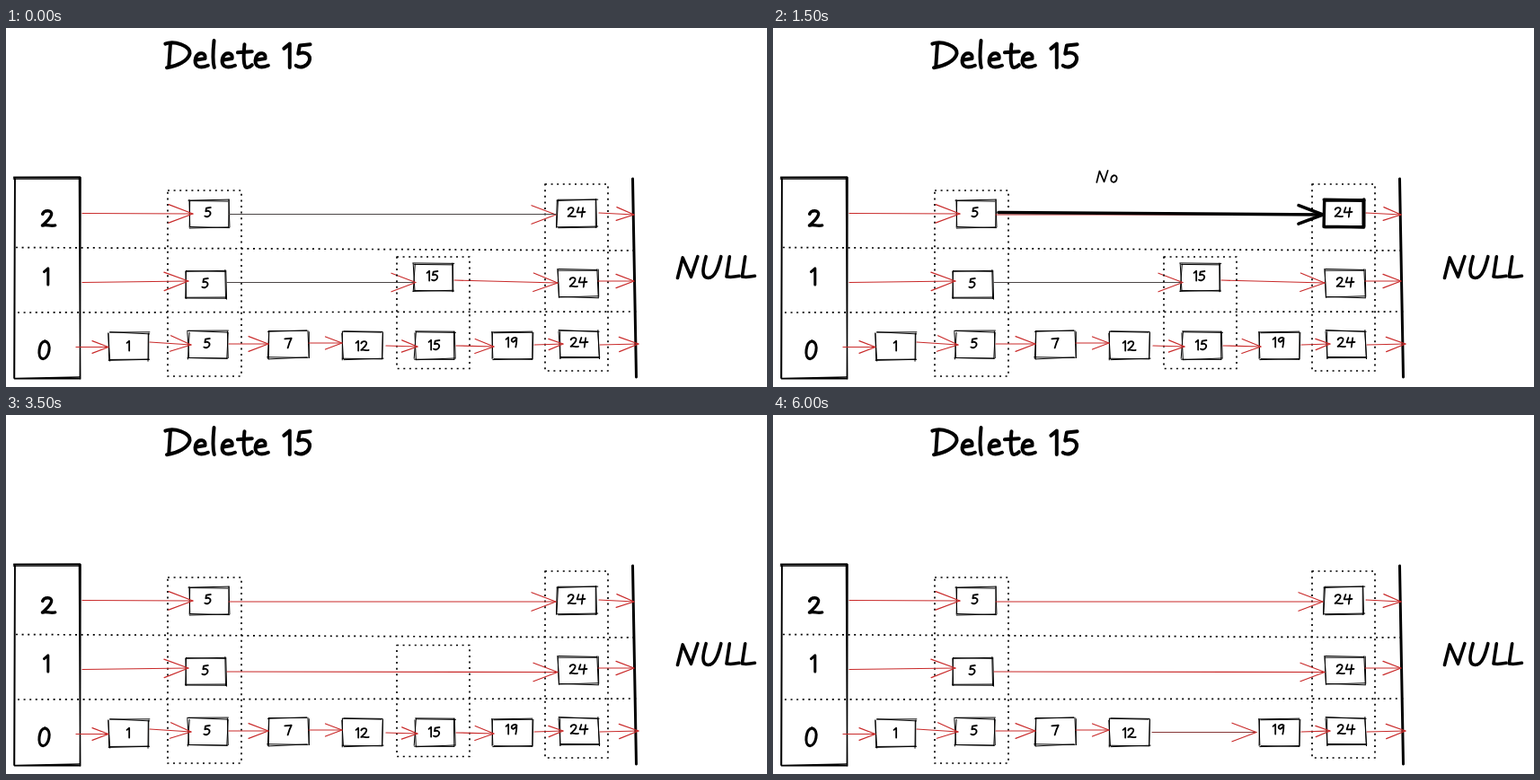
These frames come from a looping animation (847 by 400 pixels, 8 s). An HTML page:

```html
<!DOCTYPE html>
<html lang="en">
<head>
<meta charset="utf-8">
<title>Skip list: delete 15</title>
<style>
  html, body { margin: 0; width: 100%; height: 100%; overflow: hidden; background: #fff; }
  svg { display: block; width: 847px; height: 400px; }
  path { fill: none; stroke-linecap: round; stroke-linejoin: round; }
  text { font-family: "Open Sans", sans-serif; fill: transparent; }
</style>
</head>
<body>
<svg id="stage" viewBox="0 0 847 400"></svg>
<script>
const NS = 'http://www.w3.org/2000/svg';
const RED = '#c92a2a', INK = '#000', DIM = '#4c4646';
const SLOTS = 16; // 500 ms each, 8 s in all
const stage = document.getElementById('stage');
const sheet = document.head.appendChild(document.createElement('style'));
let layer = stage;

// Handwritten letters: advance and strokes, baseline at 0, capitals 10 high
const GLYPHS = {
  ' ': [5, ''],
  D: [11.4, 'M2.3-9.2L1.7-.1M.3-9.5C4-11 10.4-8.6 10.1-5.6C9.5-2.6 5-.6 .9 .1'],
  E: [7.5, 'M6-9.5L1.4-9L.8-.3L6-.6M1.2-5L5-5.3'],
  L: [7.3, 'M2-10L.6-.6C2.5-.2 4.5-.5 6.5-.9'],
  N: [11.5, 'M.2 0L2.6-9.5L6.5-.5L9.6-10'],
  U: [11, 'M2-10C.6-5-.5-.3 3 0C6.5 0 8-6 9-10'],
  a: [8, 'M5-5.5C2-7 0-2.5 1.2-.6C3 .5 4.8-3 5.2-5.4C4.8-2.5 5-.5 6.8 0'],
  e: [6.8, 'M.9-3L4.8-3.6C5.3-6 2.2-6.6 1.1-4C.2-1 2 .9 6-.8'],
  h: [7.5, 'M1.2-10L.8 0C1.5-3.5 3-5.8 4.6-5C5.6-4 4.8-1 5.8 0'],
  l: [4, 'M1.6-10.8C1.1-6 1.1-2 1.7 0'],
  n: [7.5, 'M.8-5.8L.9 0C1.5-4 3-6 4.6-5.2C5.8-4 5-1 6 0'],
  o: [7.5, 'M3.5-6C.5-5.5-.2-1 2.5-.2C6 .2 7-5.8 3.5-6'],
  q: [7.5, 'M5-5.5C2-7 0-3 1.2-1C3 0 4.8-3 5.2-5.5L4.6 3.5L6 2.5'],
  s: [6, 'M4.5-6C2-7 .5-4.8 2.5-3.8C5.5-2.5 4 .3 .3-.3'],
  t: [6.5, 'M3-9.3C2.6-5 2.4 0 4 0C5 0 5.5-.5 6-1M.3-6L6-6.4'],
  u: [7, 'M.8-5.8C.3-2 .8 0 2.2 0C4-.2 5-3 5.2-5.8C5-2.5 5-.5 6.2 0'],
  0: [8, 'M3.8-9.8C.5-9.3-.5-1 2.5-.2C6 .3 8-9 3.8-9.8'],
  1: [5, 'M.5-7.6L2.8-9.5L2.8 0'],
  2: [8.8, 'M.6-7.2C1.5-9.8 6.5-9.8 5.8-6.8C5-4 2-2 .5-.5C3-1.5 5 .2 8-.6'],
  4: [9.4, 'M2.2-9.3L.6-4.6C3-4.2 5.4-4.6 8.5-5M6.4-9L5.2 0'],
  5: [6.6, 'M6-9.3L1.8-8.8L1.2-5.5C4-6.8 6.5-5 5.6-2.5C4.8-.3 2 .4 .3-.8'],
  7: [7.5, 'M.3-9L6.8-9.5C5-6 4-3 3.2 0'],
  9: [7.5, 'M6-8.5C4-10.8 0-8 1.2-5.8C2.5-4 5.5-6.5 6-8.8C6-5 5.5-2 5 0'],
  '?': [6, 'M.6-8C1.5-11 6-10 5.2-7.5C4.5-5.5 2.8-5.5 2.6-3M2.5-.6L2.6 0']
};

let seed = 15;
const jitter = amp => {
  seed = (seed * 16807) % 2147483647;
  return (seed / 2147483647 - 0.5) * 2 * amp;
};

function add(tag, attrs, parent = layer) {
  const el = document.createElementNS(NS, tag);
  for (const key in attrs) el.setAttribute(key, attrs[key]);
  return parent.appendChild(el);
}

const stroke = (d, color, width, extra) =>
  add('path', { d, stroke: color, 'stroke-width': width, ...extra });

function write(str, x, y, scale, width) {
  add('text', { x, y, 'font-size': scale * 12 }).textContent = str;
  for (const ch of str) {
    const [advance, d] = GLYPHS[ch];
    if (d) stroke(d, INK, width / scale, { transform: `translate(${x} ${y}) scale(${scale})` });
    x += advance * scale;
  }
}

// Two loose passes around a rectangle
function box(x, y, w, h, width = 1, amp = 1.3) {
  const corners = [[x, y], [x + w, y], [x + w, y + h], [x, y + h]];
  let d = '';
  for (let pass = 0; pass < 2; pass++) {
    corners.forEach((p, i) => {
      const q = corners[(i + 1) % 4];
      d += `M${p[0] + jitter(amp)} ${p[1] + jitter(amp)}L${q[0] + jitter(amp)} ${q[1] + jitter(amp)}`;
    });
  }
  stroke(d, INK, width);
}

const heavyBox = (x, y) => box(x, y, 44, 30, 3.4, 0.7);

function node(label, x, y, tx, ty) {
  box(x, y, 44, 30);
  write(label, tx, ty - 0.5, 1.13, 1.8);
}

function tip(x1, y1, x2, y2, color, width) {
  const len = Math.hypot(x2 - x1, y2 - y1);
  const back = Math.min(27, len / 2), side = back * 0.38;
  const ux = (x2 - x1) / len, uy = (y2 - y1) / len;
  const bx = x2 - ux * back, by = y2 - uy * back;
  stroke(`M${bx - uy * side} ${by + ux * side}L${x2} ${y2}L${bx + uy * side} ${by - ux * side}`, color, width);
}

const line = (x1, y1, x2, y2, color = RED, width = 1.2) =>
  stroke(`M${x1} ${y1}L${x2} ${y2}`, color, width);

function arrow(x1, y1, x2, y2, color = RED, width = 1.2, shaft = color) {
  line(x1, y1, x2, y2, shaft, width);
  tip(x1, y1, x2, y2, color, width);
}

const heavyArrow = (...ends) => arrow(...ends, INK, 3.6);

const dotted = d => stroke(d, INK, 1.7, { 'stroke-dasharray': '2 4.6', style: 'stroke-linecap:butt' });
const dottedBox = (l, t, r, b) => dotted(`M${l} ${t}H${r}V${b}H${l}Z`);

// Draws a group that is visible from slot a up to slot b
let count = 0;
function during(a, b, draw) {
  const name = 'show' + count++;
  const pct = slot => slot / SLOTS * 100 + '%';
  let rules = `0%{visibility:${a ? 'hidden' : 'visible'}}`;
  if (a) rules += `${pct(a)}{visibility:visible}`;
  rules += `${pct(b)}{visibility:${b < SLOTS ? 'hidden' : 'visible'}}`;
  if (b < SLOTS) rules += '100%{visibility:hidden}';
  sheet.append(`@keyframes ${name}{${rules}}`);
  layer = add('g', { style: `animation:${name} 8s step-end infinite` }, stage);
  draw();
  layer = stage;
}

// Frame of the diagram
write('Delete 15', 176.5, 44, 2.78, 4);
write('NULL', 747, 278.5, 2.38, 3.6);
box(9.5, 167, 72.5, 223, 1.6, 1);
write('2', 39.5, 221, 1.9, 3.4);
write('1', 41.5, 286, 1.9, 3);
write('0', 35.5, 369, 2.05, 3.1);
dotted('M11 244.500L704 248');
dotted('M13 317L704 316');
dottedBox(180, 181, 262, 388);
dottedBox(600, 174, 670, 382);
stroke('M697.500 168L701.500 389', INK, 3);

// Parts that stay
node('5', 204, 192, 221, 211);
node('24', 613.5, 191.5, 625, 211);
node('5', 201, 271, 218, 290);
node('24', 614.5, 269.5, 627, 289);
node('1', 115, 340, 134, 360);
node('5', 203, 338, 220, 357);
node('7', 292, 338, 310, 357);
node('12', 375, 339, 389, 360);
node('19', 542, 338.5, 556, 356);
node('24', 616, 337.5, 628, 356);
[
  [85, 206.5, 208, 207], [660, 206, 699, 208],
  [85, 283.5, 203, 282], [659, 282, 699, 282],
  [78, 355.5, 114, 355.5], [160, 350, 206, 353],
  [248, 352, 292, 352], [337, 351, 374, 351],
  [588, 353, 620, 352], [661, 353, 704, 352]
].forEach(ends => arrow(...ends));
tip(248, 208, 612, 208, RED, 1.2);
during(0, 1, () => line(248, 207.5, 612, 207.5, DIM, 1));
during(1, 16, () => line(248, 208, 612, 208));

// Level 1 before and after
during(0, 7, () => {
  node('15', 454, 263, 468, 282);
  arrow(246, 283.5, 456, 283.5, RED, 1.2, DIM);
  arrow(499, 281, 614, 284);
});
during(7, 16, () => arrow(246, 286, 614, 286.5));

// Level 0 before and after
during(0, 7, () => dottedBox(435, 255, 516, 379.5));
during(7, 12, () => dottedBox(435, 256.5, 516, 380.5));
during(0, 12, () => {
  node('15', 455.5, 339, 470, 359);
  arrow(423, 354, 458, 355);
  arrow(501, 354, 543, 355);
});
during(12, 16, () => arrow(422, 353.5, 538, 353.5, RED, 1.2, '#863838'));

// Search steps
const say = (str, x, y) => write(str, x, y, 1.32, 1.7);
during(1, 2, () => {
  heavyArrow(87, 206.5, 208, 207);
  heavyBox(204, 192);
  say('Less than 15?', 89, 169);
});
during(2, 4, () => {
  heavyArrow(251, 205.5, 612, 208);
  heavyBox(613.5, 191.5);
});
during(2, 3, () => say('Less than 15?', 318, 174));
during(3, 4, () => say('No', 360, 172));
during(4, 5, () => {
  heavyArrow(227, 226, 227, 269);
  heavyBox(201, 271);
});
during(5, 7, () => {
  heavyArrow(247, 283.5, 457, 283.5);
  heavyBox(454, 263);
});
during(5, 6, () => say('Less than 15?', 285, 272));
during(6, 7, () => say('Equal to 15?', 285, 272));
during(8, 9, () => heavyArrow(224, 303, 225, 338));
during(9, 10, () => heavyArrow(250, 351.5, 297, 352.5));
during(10, 11, () => heavyArrow(338, 351, 376, 351.5));
during(11, 12, () => heavyArrow(423, 354, 459, 355));
</script>
</body>
</html>
```
